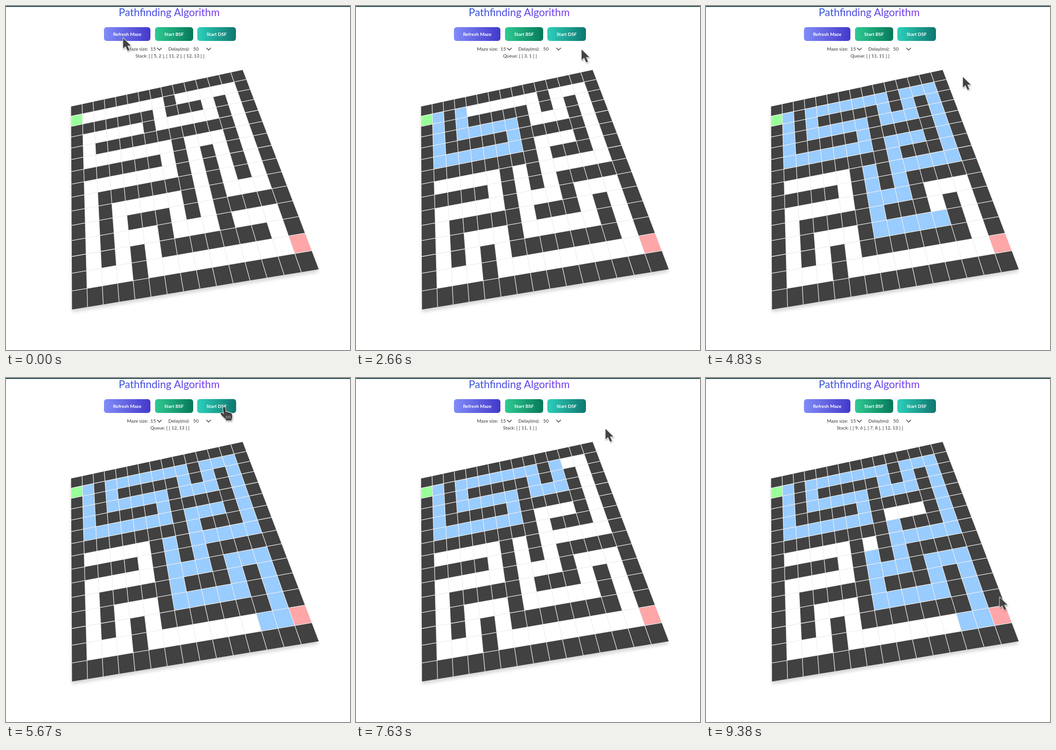
An HTML page with a canvas for the animation above (9450 ms loop, 748 px wide and 748 px high).

```html
<!DOCTYPE html>
<html lang="en">
<head>
<meta charset="utf-8">
<title>Pathfinding Algorithm</title>
<style>
  html, body { margin: 0; width: 100%; height: 100%; overflow: hidden; background: #fff; }
  body { position: relative; font: 10px/14px Lato, "Open Sans", sans-serif; color: #333; }
  body > * { position: absolute; }
  .bar { left: 0; top: 0; width: 748px; height: 1.5px; background: #25464f; }
  h1 {
    left: 245px; top: -1px; margin: 0; font-size: 23px; line-height: 28px; font-weight: 400;
    white-space: nowrap; color: transparent;
    background: linear-gradient(to right, #3257d8, #7c3aed);
    -webkit-background-clip: text; background-clip: text;
  }
  .btn {
    top: 46px; height: 30px; border-radius: 6px; color: #fff;
    font-size: 10.2px; font-weight: 700;
    display: flex; align-items: center; justify-content: center;
  }
  #refresh { left: 213px; width: 101px; background: linear-gradient(to right, #818cf8, #4338ca); }
  #bsf { left: 324px; width: 82.5px; background: linear-gradient(to right, #2fcb93, #06785a); }
  #dsf { left: 416px; width: 84px; background: linear-gradient(to right, #2dd0bc, #0f766e); }
  .opt { top: 86px; font-size: 10.2px; white-space: nowrap; }
  #list { left: 0; width: 713px; top: 101px; text-align: center; white-space: nowrap; }
  canvas, svg { left: 0; top: 0; }
  #arrow, #hand { filter: drop-shadow(1px 2px 1.5px rgba(0,0,0,.3)); }
</style>
</head>
<body>
<canvas id="board" width="748" height="748"></canvas>
<div class="bar"></div>
<h1>Pathfinding Algorithm</h1>
<div class="btn" id="refresh">Refresh Maze</div>
<div class="btn" id="bsf">Start BSF</div>
<div class="btn" id="dsf">Start DSF</div>
<span class="opt" style="left:263px">Maze size:</span>
<span class="opt" style="left:314px">15</span>
<span class="opt" style="left:353px">Delay(ms):</span>
<span class="opt" style="left:407px">50</span>
<div id="list"></div>
<svg width="748" height="748">
  <path d="M328.5 91l5 5 5-5M435.5 91l5 5 5-5" fill="none" stroke="#333" stroke-width="1.3"/>
  <g id="arrow">
    <path d="M1.5 1.5v23l5.5-5 4.5 10 4-1.8-4.3-9.5h7.3z" fill="#424242" stroke="#fff" stroke-width="1.8" paint-order="stroke" stroke-linejoin="round"/>
  </g>
  <g id="hand">
    <path d="M-2.5 2q0-3 2.8-3t3 3l1 8q3-2 4.5 1 3-1.5 4.5 1 3.500-.5 4 2.500l.8 6q0 3-1.500 5v3h-12l-1-3-6.500-6q-4.500-4.500-4.500-6.500 1-3 4-1l3 2.500z" fill="#424242" stroke="#fff" stroke-width="1.8" paint-order="stroke" stroke-linejoin="round"/>
    <path d="M5 18v6M9 18v6M13 18v6" stroke="#ddd" stroke-width="1"/>
  </g>
</svg>
<script>
const LOOP = 9450, TICK = 70, N = 15;
const $ = id => document.getElementById(id);
const ctx = $('board').getContext('2d');

// '#' wall, '.' passage, 'S' start, 'E' end
const OLD = `###############
S.......#.....#
#######.###.#.#
#.....#.....#.#
#.###########.#
#.......#...#.#
#######.#.#.#.#
#.......#.#.#.#
#.#######.#.#.#
#.#.....#.#...#
#.#.###.#.#####
#.#...#...#...#
#.#.#.#######.#
#...#.........E
###############`.split('\n');
const NEW = `###############
S.#.......#...#
#.#.#####.#.#.#
#.#.....#...#.#
#.#####.#####.#
#.......#...#.#
#########.###.#
#.....#.#.....#
#####.#.#.#####
#.....#...#...#
#.#####.###.#.#
#.#...#.....#.#
#.#.#.#######.#
#...#.........E
###############`.split('\n');
const FILL = { '#': '#414141', '.': '#fff', S: '#99ff99', E: '#ffa6a8' };

// Records the painted cells and pending list after every visit
function search(maze, label, take) {
  const open = [[0, 1]], seen = new Set(['0,1']), steps = [];
  let done = false;
  while (open.length && !done) {
    const [x, y] = open[take]();
    for (const [dx, dy] of [[0, -1], [0, 1], [-1, 0], [1, 0]]) {
      const p = [x + dx, y + dy], cell = (maze[p[1]] || '')[p[0]];
      if (cell === 'E') done = true;
      else if (cell === '.' && !seen.has('' + p)) { seen.add('' + p); open.push(p); }
    }
    steps.push({
      blue: new Set(seen),
      text: `${label}: [ ${open.map(p => `[ ${p[0]}, ${p[1]} ]`).join(', ')} ]`
    });
  }
  return steps;
}
const idle = text => ({ blue: new Set(), text });
const FIRST = idle('Stack: [ [ 5, 2 ], [ 11, 2 ], [ 12, 13 ] ]');
const bfs = search(NEW, 'Queue', 'shift');
const dfs = search(NEW, 'Stack', 'pop');

function stepAt(steps, t, start, pace, before) {
  const n = Math.floor((t - start) / pace);
  return n < 1 ? before : steps[Math.min(n, steps.length) - 1];
}
function stateAt(t) {
  if (t < 1625) return FIRST;
  if (t < 5930) return stepAt(bfs, t, 1625, 53.8, FIRST);
  return stepAt(dfs, t, 5940, 54, idle(bfs[bfs.length - 1].text));
}

// Perspective map of the grid onto the tilted board
const project = (([x0, y0], [x1, y1], [x2, y2], [x3, y3]) => {
  const ax = x1 - x2, ay = y1 - y2, bx = x3 - x2, by = y3 - y2;
  const sx = x0 - x1 + x2 - x3, sy = y0 - y1 + y2 - y3, det = ax * by - bx * ay;
  const g = (sx * by - bx * sy) / det, h = (ax * sy - sx * ay) / det;
  return (c, r) => {
    const u = c / N, v = r / N, w = 1 + g * u + h * v;
    return [
      (x0 + (x1 - x0 + g * x1) * u + (x3 - x0 + h * x3) * v) / w,
      (y0 + (y1 - y0 + g * y1) * u + (y3 - y0 + h * y3) * v) / w
    ];
  };
})([141.5, 218.5], [514.5, 139], [680, 572.5], [143.5, 660]);

function quad(c, r, size, fill) {
  ctx.beginPath();
  ctx.moveTo(...project(c, r));
  ctx.lineTo(...project(c + size, r));
  ctx.lineTo(...project(c + size, r + size));
  ctx.lineTo(...project(c, r + size));
  ctx.closePath();
  ctx.fillStyle = fill;
  ctx.fill();
}
function drawBoard(maze, blue) {
  ctx.clearRect(0, 0, 748, 748);
  ctx.save();
  ctx.shadowColor = 'rgba(0,0,0,.16)';
  ctx.shadowBlur = 7;
  ctx.shadowOffsetY = 6;
  quad(0, 0, N, '#fff');
  ctx.restore();
  for (let r = 0; r < N; r++)
    for (let c = 0; c < N; c++)
      quad(c, r, 1, blue.has(c + ',' + r) && maze[r][c] === '.' ? '#99ccff' : FILL[maze[r][c]]);
  ctx.beginPath();
  for (let i = 1; i < N; i++) {
    ctx.moveTo(...project(i, 0)); ctx.lineTo(...project(i, N));
    ctx.moveTo(...project(0, i)); ctx.lineTo(...project(N, i));
  }
  ctx.strokeStyle = '#ededed';
  ctx.lineWidth = 1.3;
  ctx.stroke();
}

// Pointer stops: time, x, y
const STOPS = [
  [0, 253, 68], [420, 262, 63], [1050, 262, 63], [1400, 352, 64], [1680, 354, 64],
  [1820, 395, 78], [2100, 455, 88], [2660, 489, 93], [4060, 583, 176], [4500, 590, 180],
  [5390, 484, 92], [5530, 484, 92], [5670, 474, 64], [6000, 474, 64], [6300, 490, 78],
  [6650, 515, 95], [7630, 541, 109], [8400, 570, 190], [9380, 637, 475], [LOOP, 637, 475]
];
const HOVER = { refresh: [70, 1250], bsf: [1290, 1820], dsf: [5640, 6290] };
const clamp = v => Math.max(0, Math.min(1, v));

function pointerAt(t) {
  const i = STOPS.findIndex(s => s[0] > t), [t0, x0, y0] = STOPS[i - 1], [t1, x1, y1] = STOPS[i];
  const k = (t - t0) / (t1 - t0), e = k * k * (3 - 2 * k);
  return [x0 + (x1 - x0) * e, y0 + (y1 - y0) * e];
}

let last = -1;
function frame(now) {
  const t = Math.floor((now % LOOP) / TICK) * TICK;
  if (t !== last) {
    last = t;
    const { blue, text } = stateAt(t);
    drawBoard(t < 560 ? OLD : NEW, blue);
    $('list').textContent = text;
    let over = false;
    for (const id in HOVER) {
      const [a, b] = HOVER[id];
      if (t >= a && t < b) over = true;
      const grow = clamp((t - a) / 150) - clamp((t - b) / 150);
      $(id).style.transform = `scale(${1 + 0.05 * grow})`;
    }
    const [x, y] = pointerAt(t);
    for (const id of ['arrow', 'hand']) {
      $(id).setAttribute('transform', `translate(${x} ${y})`);
      $(id).style.display = (id === 'hand') === over ? '' : 'none';
    }
  }
  requestAnimationFrame(frame);
}
const begin = performance.now();
const loop = frame;
frame(performance.now() - begin);
</script>
</body>
</html>
```
